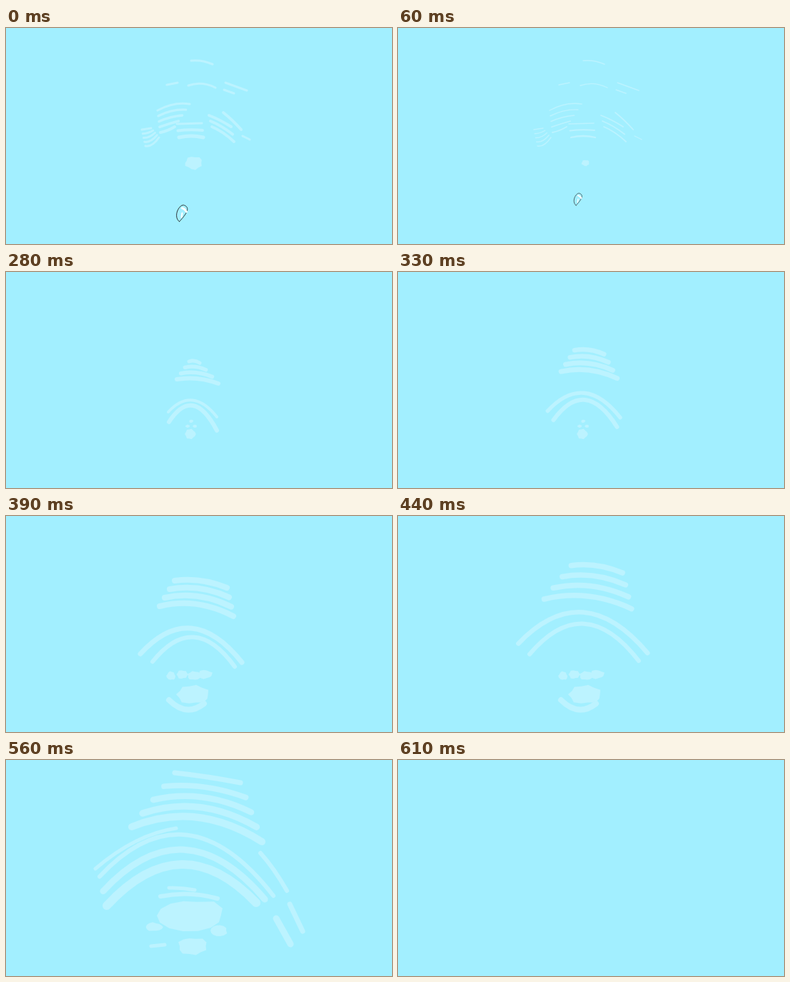
These frames come from a looping animation (540 by 304 pixels, 660 ms). An HTML page with a canvas:

```html
<!DOCTYPE html>
<html lang="en">
<head>
<meta charset="utf-8">
<title>Water splash</title>
<style>
html, body { margin: 0; width: 100%; height: 100%; overflow: hidden; background: #a2efff; }
canvas { display: block; }
</style>
</head>
<body>
<canvas id="stage" width="540" height="304"></canvas>
<script>
const ctx = document.getElementById('stage').getContext('2d');
const WATER = '#a2efff', FOAM = '#bcf3ff';
const LOOP = 660, LANDING = 170;
const STEPS = [0, 60, 110, 170, 220, 280, 330, 390, 440, 500, 560, 610];

const lerp = (a, b, t) => a + (b - a) * t;
const mix = (a, b, t) => a.map((v, i) => lerp(v, b[i], t));
const noise = (x, y, i) => {
  const v = Math.sin(x * 12.9 + y * 78.2 + i * 37.7) * 43758.5;
  return v - Math.floor(v);
};

// A wave is [width, x0, y0, x1, y1, height of its middle above the chord].
function wave([width, x0, y0, x1, y1, bend], thickness = 1) {
  ctx.lineWidth = width * thickness;
  ctx.beginPath();
  ctx.moveTo(x0, y0);
  ctx.quadraticCurveTo((x0 + x1) / 2, (y0 + y1) / 2 - 2 * bend, x1, y1);
  ctx.stroke();
}

// Evenly spaced waves from one shape to another.
function stack(count, first, last, thickness) {
  for (let i = 0; i < count; i++) wave(mix(first, last, i / (count - 1)), thickness);
}

// A rough-edged patch of foam.
function lump(x, y, rx, ry) {
  const points = 14;
  ctx.beginPath();
  for (let i = 0; i < points; i++) {
    const angle = i / points * 2 * Math.PI, r = .85 + .3 * noise(x, y, i);
    ctx.lineTo(x + rx * r * Math.cos(angle), y + ry * r * Math.sin(angle));
  }
  ctx.closePath();
  ctx.fill();
}

function ring(count, x, y, rx, ry, size, start) {
  for (let i = 0; i < count; i++) {
    const angle = start + i / count * 2 * Math.PI;
    lump(x + rx * Math.cos(angle), y + ry * Math.sin(angle), size, size * .7);
  }
}

// Rows rise above the splash, arcs spread around it, spray is the loose foam.
const poses = [
  {
    at: 170, rows: 4, arcs: 0,
    top: [4, 265, 146, 273, 147, 3], base: [6, 249, 165, 281, 169, 0],
    outer: [5, 252, 201, 271, 202, 7], inner: [3, 247, 208, 273, 206, 4],
    spray() {
      lump(263, 200, 10, 9);
      lump(248, 215, 4, 9);
      lump(274, 219, 9, 6);
      ctx.fillStyle = WATER;
      ctx.beginPath();
      ctx.ellipse(260, 212, 13, 9, 0, 0, 7);
      ctx.fill();
    }
  },
  {
    at: 280, rows: 4, arcs: 2,
    top: [5, 256, 126, 271, 128, 2], base: [6, 239, 151, 297, 157, 4],
    outer: [4, 227, 197, 295, 204, 20], inner: [6, 228, 211, 295, 223, 29],
    spray() {
      lump(258, 228, 7, 7);
      ring(4, 259, 217, 5, 7, 3, 0);
    }
  },
  {
    at: 390, rows: 4, arcs: 2,
    top: [8, 236, 91, 309, 101, 5], base: [8, 215, 127, 318, 141, 10],
    outer: [7, 188, 194, 330, 206, 42], inner: [6, 205, 205, 320, 212, 38],
    spray() {
      lump(261, 251, 22, 13);
      for (let i = 0; i < 4; i++) lump(231 + i * 16, 225 - i % 2 * 2, 6 + i * 1.5, 6);
      wave([8, 228, 259, 277, 264, -11]);
    }
  },
  {
    at: 500, rows: 5, arcs: 3,
    top: [7, 250, 44, 320, 55, 5], base: [7, 192, 105, 337, 118, 12],
    outer: [6, 145, 162, 372, 177, 61], inner: [6, 159, 182, 357, 194, 59],
    spray() {
      stack(2, [4, 233, 184, 289, 182, 2], [5, 227, 194, 298, 197, 6]);
      ring(6, 253, 234, 46, 22, 13, -1);
    }
  },
  {
    at: 560, rows: 5, arcs: 3,
    top: [7, 236, 18, 328, 32, 1], base: [10, 176, 94, 358, 115, 24],
    outer: [6, 131, 164, 374, 191, 72], inner: [12, 141, 205, 350, 201, 56],
    spray() {
      wave([5, 125, 153, 238, 96, 10]);
      wave([6, 356, 131, 393, 184, 3]);
      stack(2, [7, 397, 203, 415, 241, 0], [9, 378, 223, 398, 259, 0]);
      stack(2, [5, 228, 180, 264, 183, 1], [6, 216, 192, 296, 195, 5]);
      lump(258, 219, 46, 22);
      lump(208, 235, 11, 6);
      lump(297, 240, 12, 8);
      lump(261, 262, 20, 12);
      wave([5, 203, 262, 222, 260, 0]);
    }
  }
];

function drawSplash(time) {
  const i = poses.findLastIndex(pose => pose.at <= time);
  const a = poses[i], b = poses[i + 1] || a;
  const t = a === b ? 0 : (time - a.at) / (b.at - a.at);
  const shape = key => mix(a[key], b[key], t);
  stack(Math.round(lerp(a.rows, b.rows, t)), shape('top'), shape('base'));
  stack(t ? 2 : a.arcs, shape('outer'), shape('inner'));
  a.spray();
}

function drawFading(thickness) {
  const waves = (count, first, last) => stack(count, first, last, thickness);
  waves(2, [3, 259, 46, 289, 51, 2], [3, 255, 81, 293, 84, 4]);
  waves(2, [3, 307, 77, 337, 88, 0], [3, 305, 87, 319, 92, 0]);
  waves(5, [3, 212, 116, 257, 107, 4], [4, 216, 147, 236, 139, -1]);
  waves(5, [3, 190, 143, 203, 141, 0], [3, 195, 166, 214, 154, -4]);
  waves(3, [3, 239, 135, 274, 134, 0], [5, 242, 154, 276, 154, 2]);
  waves(3, [4, 284, 123, 315, 139, 1], [4, 288, 139, 319, 160, 2]);
  waves(2, [4, 304, 119, 329, 143, 1], [3, 331, 152, 341, 157, 0]);
  wave([3, 225, 80, 240, 77, 0], thickness);
  lump(262, 190, 12 * thickness, 9 * thickness);
}

function drawDrop(t) {
  ctx.save();
  ctx.translate(lerp(246.5, 262, t), lerp(260.5, 205, t));
  ctx.scale(1 - .75 * t, 1 - .75 * t);
  ctx.beginPath();
  ctx.moveTo(-4, 12);
  ctx.bezierCurveTo(-14, 4, -3, -14, 3, -11);
  ctx.bezierCurveTo(10, -8, 9, -2, -4, 12);
  ctx.fillStyle = WATER;
  ctx.fill();
  ctx.strokeStyle = '#222';
  ctx.lineWidth = .9;
  ctx.stroke();
  ctx.strokeStyle = '#fff';
  wave([3, 0, -7, 6, -2, 1]);
  wave([2, 0, 0, -1, 6, 0]);
  ctx.restore();
}

function draw(now) {
  const time = STEPS.findLast(step => step <= now % LOOP);
  ctx.fillStyle = WATER;
  ctx.fillRect(0, 0, 540, 304);
  ctx.fillStyle = ctx.strokeStyle = FOAM;
  ctx.lineCap = 'round';
  if (time < 110) drawFading(1 - time / 110);
  if (time < LANDING) drawDrop(time / LANDING);
  else if (time < 610) drawSplash(time);
}

const begin = performance.now();
function tick() {
  draw(performance.now() - begin);
  requestAnimationFrame(tick);
}
tick();
</script>
</body>
</html>
```
